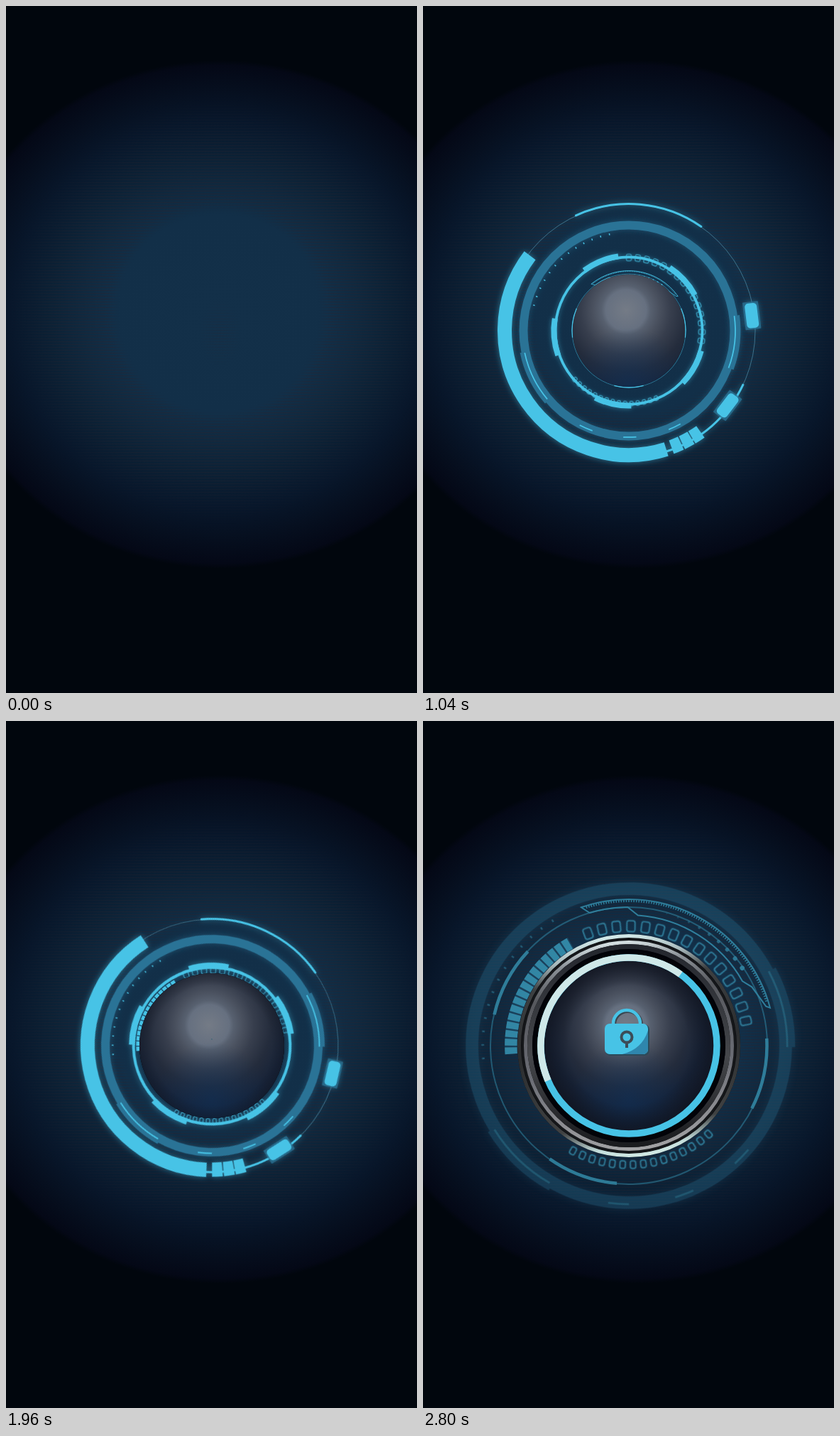
Recreate the animation shown at these times as an HTML page. Size 579 px wide and 967 px high, loop 3800 ms.

```html
<!DOCTYPE html>
<html lang="en">
<head>
<meta charset="utf-8">
<title>Lock dial</title>
<style>
  html, body { margin: 0; width: 100%; height: 100%; overflow: hidden; background: #00060d; }
  svg { display: block; width: 100%; height: 100%; }
</style>
</head>
<body>
<svg viewBox="0 0 579 967" fill="none">
  <defs>
    <radialGradient id="room" gradientUnits="userSpaceOnUse" cx="0" cy="0" r="365"
      gradientTransform="translate(302 434) scale(1.06 .98)">
      <stop offset="0" stop-color="#133049"/>
      <stop offset=".39" stop-color="#122f48"/>
      <stop offset=".5" stop-color="#10293f"/>
      <stop offset=".62" stop-color="#0c2135"/>
      <stop offset=".76" stop-color="#08172b"/>
      <stop offset=".88" stop-color="#060f1f"/>
      <stop offset=".98" stop-color="#040816"/>
      <stop offset="1.0" stop-color="#01060d"/>
    </radialGradient>
    <radialGradient id="band" gradientUnits="userSpaceOnUse" cx="300" cy="430" r="300">
      <stop offset=".47" stop-color="#000"/>
      <stop offset=".53" stop-color="#fff"/>
      <stop offset=".75" stop-color="#bbb"/>
      <stop offset="1" stop-color="#000"/>
    </radialGradient>
    <radialGradient id="spot">
      <stop offset="0" stop-color="#fff" stop-opacity=".6"/>
      <stop offset="1" stop-color="#fff" stop-opacity="0"/>
    </radialGradient>
    <pattern id="lines" width="8" height="4" patternUnits="userSpaceOnUse">
      <rect width="8" height="1" fill="#2a2430"/>
    </pattern>
    <mask id="lineMask" maskUnits="userSpaceOnUse" x="0" y="0" width="579" height="967">
      <rect width="579" height="967" fill="url(#band)"/>
      <ellipse cx="302" cy="460" rx="30" ry="48" fill="url(#spot)"/>
    </mask>
    <radialGradient id="face" gradientUnits="userSpaceOnUse" cx="-4" cy="-29" r="150">
      <stop offset="0" stop-color="#747b86"/>
      <stop offset=".19" stop-color="#667080"/>
      <stop offset=".23" stop-color="#57606f"/>
      <stop offset=".31" stop-color="#4a515f"/>
      <stop offset=".42" stop-color="#373e4d"/>
      <stop offset=".58" stop-color="#242c3c"/>
      <stop offset=".75" stop-color="#172338"/>
      <stop offset="1" stop-color="#111d32"/>
    </radialGradient>
    <radialGradient id="shine" gradientUnits="userSpaceOnUse" cx="0" cy="75" r="80">
      <stop offset="0" stop-color="#0f3058" stop-opacity=".6"/>
      <stop offset="1" stop-color="#0f3058" stop-opacity="0"/>
    </radialGradient>
    <radialGradient id="edge" gradientUnits="userSpaceOnUse" cx="0" cy="0" r="121">
      <stop offset=".7" stop-color="#10131d" stop-opacity="0"/>
      <stop offset="1" stop-color="#10131d" stop-opacity=".75"/>
    </radialGradient>
    <linearGradient id="rim" gradientUnits="userSpaceOnUse" x1="-20" y1="-157" x2="20" y2="157">
      <stop offset="0" stop-color="#d6eeee"/>
      <stop offset=".1" stop-color="#a9babd"/>
      <stop offset=".2" stop-color="#3d4042"/>
      <stop offset=".5" stop-color="#2b2d2f"/>
      <stop offset=".85" stop-color="#3f4142"/>
      <stop offset=".95" stop-color="#c4dedc"/>
      <stop offset="1" stop-color="#d3ebe6"/>
    </linearGradient>
    <linearGradient id="bevel" gradientUnits="userSpaceOnUse" x1="-15" y1="-147" x2="15" y2="147">
      <stop offset="0" stop-color="#d9e4e6"/>
      <stop offset=".1" stop-color="#8a9096"/>
      <stop offset=".25" stop-color="#56585d"/>
      <stop offset=".6" stop-color="#6a6c74"/>
      <stop offset="1" stop-color="#a2a2a4"/>
    </linearGradient>
    <linearGradient id="inner" gradientUnits="userSpaceOnUse" x1="0" y1="-140" x2="0" y2="140">
      <stop offset="0" stop-color="#23262d"/>
      <stop offset=".55" stop-color="#45474b"/>
      <stop offset="1" stop-color="#1a1b1e"/>
    </linearGradient>
    <filter id="glow" filterUnits="userSpaceOnUse" x="-250" y="-250" width="500" height="500">
      <feGaussianBlur stdDeviation="4.5" result="b"/>
      <feComponentTransfer in="b" result="soft"><feFuncA type="linear" slope=".5"/></feComponentTransfer>
      <feMerge><feMergeNode in="soft"/><feMergeNode in="SourceGraphic"/></feMerge>
    </filter>
    <clipPath id="iris"><circle id="irisCircle" r="0"/></clipPath>
    <clipPath id="lockBody"><rect x="-34" y="-22" width="61" height="43" rx="7"/></clipPath>
  </defs>

  <rect width="579" height="967" fill="url(#room)"/>
  <rect width="579" height="967" fill="url(#lines)" mask="url(#lineMask)" opacity=".5"/>

  <g transform="translate(290 457)">
    <g id="plate"></g>
    <g id="band2" filter="url(#glow)"></g>
    <g id="outer" filter="url(#glow)"></g>
    <g id="blocks"></g>
    <g id="ticks"></g>
    <g id="bumps" filter="url(#glow)"></g>
    <g id="cells"></g>
    <g clip-path="url(#iris)"><g id="knob"></g></g>
    <g transform="translate(0 -9)"><g id="lock"></g></g>
  </g>
</svg>
<script>
const CYAN = '#47c3e6', TEAL = '#2a7396', PALE = '#cfe8e8';
const LOOP = 3800, STEP = 40;
const $ = id => document.getElementById(id);
const range = (n, f) => Array.from({ length: n }, (_, i) => f(i)).join('');

// Angles are degrees, clockwise from east.
const pt = (r, a) => {
  const k = a * Math.PI / 180;
  return (r * Math.cos(k)).toFixed(2) + ' ' + (r * Math.sin(k)).toFixed(2);
};
const sweep = (r, a, b) => `A${r} ${r} 0 ${Math.abs(b - a) > 180 ? 1 : 0} ${b > a ? 1 : 0} ${pt(r, b)}`;
const arc = (r, a, b, w, c = CYAN, extra = '') =>
  `<path d="M${pt(r, a)}${sweep(r, a, b)}" stroke="${c}" stroke-width="${w}" ${extra}/>`;
const ring = (r, w, c, extra = '') => `<circle r="${r}" stroke="${c}" stroke-width="${w}" ${extra}/>`;
const box = (r, a, w, h, rx, style) =>
  `<rect x="${r - w / 2}" y="${-h / 2}" width="${w}" height="${h}" rx="${rx}" transform="rotate(${a})" ${style}/>`;
const spoke = (r1, r2, a, w, c = CYAN) =>
  `<path d="M${pt(r1, a)}L${pt(r2, a)}" stroke="${c}" stroke-width="${w}"/>`;

const handle = a =>
  box(174.5, a, 22, 39, 1, `fill="${TEAL}" opacity=".75"`) +
  box(174.5, a, 17, 35, 5, `fill="${CYAN}"`);

$('outer').innerHTML =
  ring(178, 1, '#5a9db8', 'opacity=".6"') +
  arc(178.5, 245.3, 304.8, 3, CYAN, 'stroke-linecap="round"') +
  arc(178, 25, 73, 3) +
  arc(175, 72.5, 217.2, 20) +
  [65.2, 59.9, 54.7].map(a => arc(174.5, a, a + 4.7, 20)).join('') +
  handle(37.1) + handle(-7);

$('band2').innerHTML =
  ring(150, 12, TEAL) +
  arc(154, -8, 20.5, 10, TEAL) + arc(154, 139, 168.5, 8, TEAL) +
  [[-8, 20.5], [140, 168], [110, 117.5], [86, 93], [61, 68]]
    .map(([a, b]) => arc(151.5, a, b, 1.8)).join('') +
  range(13, i => spoke(138.5, 141, 195 + i * 5.3, 1.5));

$('bumps').innerHTML =
  ring(124, 4.5, CYAN) + range(5, i => arc(126.5, -57 + i * 72.6, -28.5 + i * 72.6, 9.5));

$('cells').innerHTML =
  range(15, i => box(110, -90 + i * 7, 10, 7.5, 2, `stroke="${CYAN}" stroke-width="1.1"`)) +
  range(15, i => box(109.5, 68 + i * 5, 7, 5, 1.8, `stroke="${CYAN}" stroke-width="1.1"`));

$('blocks').innerHTML =
  arc(105.5, 156, 220.5, 11, TEAL, 'opacity=".5"') +
  range(16, i => arc(105.5, 156 + i * 4.05, 159.2 + i * 4.05, 11));

$('ticks').innerHTML =
  range(120, i => spoke(95, i % 6 ? 98.5 : 102, i * 3, i % 6 ? 1 : 1.6));

$('plate').innerHTML =
  ring(195, 2, CYAN, 'opacity=".6"') +
  [[-23, 7], [173, 203], [75, 105]].map(([a, b]) => arc(194.5, a, b, 4.5)).join('') +
  `<path d="M${pt(206, 231)}${sweep(206, 231, 325)}L${pt(201, 324)}` +
  `L${pt(192, 314.5)}L${pt(184, 310.5)}${sweep(184, 310.5, 254)}` +
  `L${pt(195, 249.5)}${sweep(195, 249.5, 233.5)}Z" stroke="${CYAN}" stroke-width="2"/>` +
  range(90, i => spoke(202, 206, 233 + i, 1.5)) +
  range(9, i => `<circle r="${1.3 + i * 0.25}" fill="${CYAN}" opacity="${0.2 + i * 0.1}"
    transform="rotate(${-94 + i * 4.95}) translate(193.5 0)"/>`);

$('knob').innerHTML =
  '<circle r="157" fill="#0b0c0f"/>' +
  ring(154.5, 5, 'url(#rim)') + ring(149.5, 3.5, '#15171a') +
  ring(145.5, 5, 'url(#bevel)') + ring(139.5, 7, 'url(#inner)') +
  '<circle r="136" fill="#020308"/>' +
  '<circle r="121" fill="url(#face)"/><circle r="121" fill="url(#shine)"/>' +
  '<circle r="121" fill="url(#edge)"/>' +
  ring(124, 9.5, CYAN) + arc(124, 156.7, 306, 9.5, PALE);

$('lock').innerHTML =
  '<path d="M-22 -20V-22A19 19 0 0 1 16 -22V-20" stroke="#39464f" stroke-width="5" transform="translate(1.5 1.5)"/>' +
  `<path d="M-22 -20V-22A19 19 0 0 1 16 -22V-20" stroke="${CYAN}" stroke-width="4.5"/>` +
  '<rect x="-33" y="-21" width="62" height="44" rx="7" fill="#2c4a5a"/>' +
  `<g clip-path="url(#lockBody)"><rect x="-34" y="-22" width="61" height="43" fill="${CYAN}"/>` +
  '<path d="M28 -16Q20 16 -14 22H28Z" fill="#2f86ad"/></g>' +
  '<circle cx="-3" cy="-3" r="7.5" stroke="#3c4c58" stroke-width="4"/>' +
  '<path d="M-3 3V12" stroke="#3c4c58" stroke-width="4"/>';

// Piecewise linear track: time, value, time, value...
const track = (...k) => t => {
  if (t <= k[0]) return k[1];
  for (let i = 2; i < k.length; i += 2)
    if (t <= k[i]) return k[i - 1] + (k[i + 1] - k[i - 1]) * (t - k[i - 2]) / (k[i] - k[i - 2]);
  return k[k.length - 1];
};

const turn = track(1400, 0, 1840, 20);
const iris = track(706, 0, 1106, 95, 1920, 95, 1960, 102, 2240, 158);
const one = () => 1;
const parts = [
  { id: 'outer', dir: 1, size: track(200, 0, 760, .945, 860, 1.03, 1000, 1, 1980, 1, 2240, .81),
    alpha: track(2120, 1, 2260, 0) },
  { id: 'band2', dir: -1, size: track(460, 0, 760, .75, 900, 1.02, 1040, .99, 1120, 1, 2400, 1, 2760, 1.473),
    alpha: track(2400, 1, 2760, .35) },
  { id: 'plate', dir: 1, size: track(306, 0, 760, .254, 1040, .41, 1100, .44, 1980, .44, 2260, 1),
    alpha: track(1980, 1, 2260, .55) },
  { id: 'bumps', dir: 1, size: track(706, 0, 1106, 1, 1840, 1, 1960, .89, 2160, .7),
    alpha: track(740, .35, 900, 1) },
  { id: 'cells', dir: -1, size: track(760, 0, 1040, .936, 1100, 1, 1840, 1, 1960, .97, 2400, 1, 2760, 1.53),
    alpha: track(2400, .9, 2760, .6) },
  { id: 'blocks', dir: 1, size: track(900, 0, 1300, 1, 1840, 1, 1960, .96, 2280, 1.53, 2440, 1.575),
    alpha: track(2320, 1, 2720, .6) },
  { id: 'ticks', dir: 1, size: track(900, 0, 1300, 1), alpha: track(1880, 1, 1960, 0) },
  { id: 'lock', dir: 0, size: track(1952, 0, 2352, 1), alpha: one }
].map(p => ({ ...p, node: $(p.id) }));

function draw(t) {
  for (const { node, dir, size, alpha } of parts) {
    const s = size(t), a = alpha(t);
    node.style.display = s > 0 && a > 0 ? '' : 'none';
    node.setAttribute('transform', `rotate(${dir * turn(t)}) scale(${s})`);
    node.setAttribute('opacity', a);
  }
  $('irisCircle').setAttribute('r', iris(t));
}

const start = performance.now();
function tick() {
  const t = (performance.now() - start) % LOOP;
  draw(Math.floor(t / STEP) * STEP);
  requestAnimationFrame(tick);
}
tick();
</script>
</body>
</html>
```
